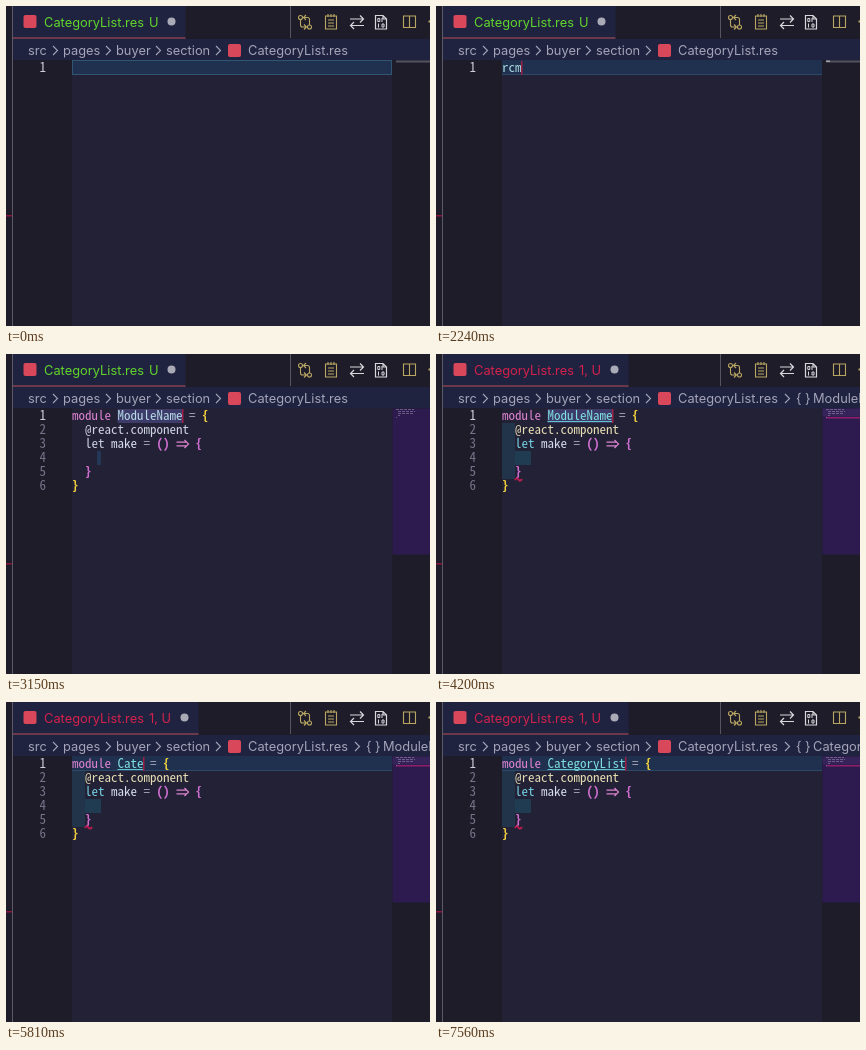
An HTML page for the animation above (8000 ms loop, 424 px wide and 320 px high).

```html
<!DOCTYPE html>
<html lang="en">
<head>
<meta charset="utf-8">
<title>Editor snippet</title>
<style>
html, body { margin: 0; width: 100%; height: 100%; overflow: hidden; background: #1e1c29; }
svg { display: block; width: 424px; height: 320px; }
text { white-space: pre; }
.ui { font: 12.85px Inter, "Open Sans", sans-serif; }
.code { font-family: "Noto Sans Mono CJK JP", "Noto Sans Mono", monospace; }
</style>
</head>
<body>
<svg id="stage" viewBox="0 0 424 320" xmlns="http://www.w3.org/2000/svg"></svg>
<script>
const LOOP = 8000, LEFT = 66, TOP = 55, CELL = 6.5, ROW = 14;
const MONO = '"Noto Sans Mono CJK JP", "Noto Sans Mono", monospace';
const C = {
  navy: '#1f2340', dark: '#1e1c29', page: '#232135', grey: '#a5a4b8', red: '#d4214c',
  icon: '#d9475b', green: '#62d52c', pink: '#dc83cf', cyan: '#80dfe0', gold: '#f2d13e',
  white: '#d5dceb', orchid: '#d06fd2', tool: '#b8a662'
};

// Times at which the visible text changes
const TYPED = [[1960, 'r'], [2100, 'rc'], [2240, 'rcm']];
const NAMES = [[3150, 'ModuleName'], [5530, 'C'], [5670, 'Ca'], [5740, 'Cat'], [5810, 'Cate'],
  [6230, 'Categ'], [6300, 'Catego'], [6440, 'Categor'], [6580, 'Category'],
  [7140, 'CategoryL'], [7210, 'CategoryLi'], [7350, 'CategoryLis'], [7490, 'CategoryList']];
const CRUMBS = [[3640, 'ModuleName'], [6230, 'Cate'], [7000, 'CategoryList']];
const CARET = [[1120, 1610], [1960, 2800], [3150, 3640], [4200, 4760], [5250, LOOP]];

const svg = document.getElementById('stage');
const pen = document.createElement('canvas').getContext('2d');
pen.font = '100px ' + MONO;
const em = 100 / pen.measureText('m').width;
const BOLD = 'font-weight="bold"';

const at = (steps, t) => steps.reduce((v, [time, s]) => t >= time ? s : v, '');
const col = n => LEFT + n * CELL;
const rowY = n => TOP + (n - 1) * ROW;
const rect = (x, y, w, h, fill, more = '') =>
  `<rect x="${x}" y="${y}" width="${w}" height="${h}" fill="${fill}" ${more}/>`;
const path = (d, stroke, w = 1, more = '') =>
  `<path d="${d}" fill="none" stroke="${stroke}" stroke-width="${w}" ${more}/>`;
const ui = (x, y, s, fill) => `<text class="ui" x="${x}" y="${y}" fill="${fill}">${s}</text>`;
const mono = (x, y, s, fill, cell = CELL, more = '') =>
  `<text class="code" x="${x}" y="${y}" font-size="${(cell * em).toFixed(2)}" fill="${fill}" ${more}>${s}</text>`;
const code = (row, n, s, fill, more) => mono(col(n), rowY(row) + 11, s, fill, CELL, more);
const fileIcon = (x, y) => rect(x, y, 13, 13, C.icon, 'rx="2"');
const chevron = x => path(`M${x} 40l4.5 4.5l-4.5 4.5`, C.grey, 1.1);

function toolbar() {
  const y = C.tool, w = '#d8d8dc';
  return path('M284.5 0V32', '#56545f') +
    // compare
    `<g fill="none" stroke="${y}" stroke-width="1.1"><circle cx="294.5" cy="11.5" r="2"/><circle cx="303.5" cy="21" r="2"/>` +
    '<path d="M294.5 13.5V19q0 2 2 2h4M298 18.5l2.5 2.5l-2.5 2.5M303.5 19v-5.5q0-2-2-2h-4M300 9l-2.5 2.5l2.5 2.5"/></g>' +
    // notepad
    path('M319.5 10h11v13h-11zM322 8v3M325 8v3M328 8v3M322 14h6M322 17h6M322 20h6', y, 1.1) +
    // swap
    path('M344 13h13M354 9.5l3.5 3.5l-3.5 3.5M358 19.5h-13M348 16l-3.5 3.5l3.5 3.5', w, 1.2) +
    // binary file
    path('M369.5 9.5h7.5l3.5 3.5v10h-11zM377 9.5v3.5h3.5', w, 1.2) +
    path('M371.8 12.5h2v3h-2zM376 12v4M372.5 17.5v4M376 18h2v3h-2z', w) +
    // split
    path('M397.5 10h12v11.5h-12zM403.5 10v11.5', y, 1.1) +
    rect(422.5, 14.5, 1.5, 2, y);
}

function header(t) {
  const bad = t >= 3570, tint = bad ? C.red : C.green, edge = bad ? 192.5 : 179.5;
  const crumb = at(CRUMBS, t);
  let s = rect(7, 0, edge - 7, 33, C.navy) + rect(7, 31.5, edge - 7, 1, '#b65055') +
    fileIcon(17.5, 9) +
    ui(38, 20.5, 'CategoryList.res', tint) + ui(143, 20.5, bad ? '1, U' : 'U', tint) +
    `<circle cx="${bad ? 178.5 : 165.5}" cy="15.5" r="4" fill="#aaa9b6"/>` + toolbar();
  s += rect(7, 33, 417, 21, C.navy);
  [[22, 'src'], [57, 'pages'], [110, 'buyer'], [160, 'section'], [242, 'CategoryList.res']]
    .forEach(([x, word]) => s += ui(x, 49, word, C.grey));
  s += [47, 100, 150, 210].map(chevron).join('') + fileIcon(222, 38);
  if (crumb) s += chevron(349) + ui(360, 48.5, '{ }', C.grey) + ui(377, 49, crumb, C.grey);
  return s;
}

function minimap(t) {
  if (t < 3150) {
    return rect(390, 54.5, 34, 2, '#55535f') + (t >= 1960 ? rect(390, 54.5, 4, 1.5, '#a3a2ad') : '');
  }
  let s = rect(386.5, 54.5, 37.5, 146, '#2d1b50');
  if (t >= 3570) s += rect(386.5, 54.5, 37.5, 8, '#35235a') + rect(390, 63, 34, 1.5, '#8f2068');
  [[0, 18], [2, 17], [2, 16], [2, 2], [0, 1]].forEach(([x, w], i) =>
    s += path(`M${390 + x} ${55.5 + i * 2}h${w}`, '#9a8fae', 1, 'stroke-dasharray="3 1" opacity=".55"'));
  return s;
}

function popup() {
  const x = 109, hot = '#ff5566', side = 5.53;
  const hit = s => `<tspan fill="${hot}" ${BOLD}>${s}</tspan>`;
  const bracket = y => path(`M91.5 ${y + 12}v-10.5h12v10.5`, '#b9bac8', 1.1) +
    path(`M92 ${y + 12}h12`, '#b9bac8', 1, 'stroke-dasharray="1 2"');
  return rect(86.5, 69.5, 345, 45, '#20294a', 'stroke="#5796ad"') +
    rect(87, 70, 337, 14, '#2b4c72') + bracket(70) + bracket(84) +
    mono(x, 80.5, hit('rcm'), hot) + mono(336, 80.5, 'Rescript-React component', '#d0606f', side) +
    mono(x, 94.5, hit('rcm') + 'wt', C.white) +
    mono(258, 94.5, 'Rescript React Component Module', '#9a9bad', side) +
    mono(90, 108.5, 'abc', '#b9bac8', 5) +
    mono(x, 108.5, hit('R') + 'ea' + hit('c') + 'tDO' + hit('M'), C.white);
}

function snippet(t, name) {
  const lit = t >= 3220, bad = t >= 3570, end = 7 + name.length;
  let s = '';
  if (lit) {
    s += rect(LEFT, rowY(2), 13, ROW * 4, '#22344a') + rect(col(2), rowY(4), 16, ROW, '#1f3c52');
  } else {
    s += rect(91, rowY(4), 4, ROW, '#253757');
  }
  if (t < 5530) s += rect(col(7), TOP, name.length * CELL, ROW, '#3c3b69');
  s += code(1, 0, 'module', C.pink) + code(1, 7, name, bad ? C.cyan : '#b7d9e8') +
    code(1, end + 1, '=', C.grey) + code(1, end + 3, '{', C.gold, BOLD) +
    code(2, 2, '@react.component', bad ? '#e4ddb4' : '#ced3e2') +
    code(3, 2, 'let', bad ? '#72cfe0' : '#c9cee0') + code(3, 6, 'make', C.white) +
    code(3, 11, '=', C.grey) + code(3, 13, '()', C.orchid, BOLD) + code(3, 19, '{', C.orchid, BOLD) +
    path('M170.5 88.2h10.5M170.5 91.8h10.5M178.5 86l4 4l-4 4', C.pink, 1.2) +
    code(5, 2, '}', C.orchid, BOLD) + code(6, 0, '}', C.gold, BOLD);
  if (bad) {
    s += rect(col(7), rowY(1) + 12, name.length * CELL, 1, '#5fc3c9') +
      path('M79 126q1.7-3 3.4-.5t3.6-.5', '#bb1d52', 2);
  }
  return s;
}

function editor(t) {
  const typed = at(TYPED, t), name = at(NAMES, t);
  let s = rect(7, 54, 417, 266, C.dark) + rect(LEFT, 54, 320, 266, C.page) + minimap(t);
  if (!name || t >= 5530) {
    s += rect(LEFT, 54, 320, 15, '#20304f') + path(`M${LEFT} 68.5h320`, '#2c4a67');
    if (!typed && !name) s += rect(LEFT + .5, 54.5, 319, 14, 'none', 'stroke="#2f5572"');
  }
  const rows = name ? 6 : 1;
  for (let i = 1; i <= rows; i++) s += mono(33.5, rowY(i) + 11, i, i === 1 ? '#d0cfdb' : '#77758a');
  s += name ? snippet(t, name) : code(1, 0, typed, '#a9dce0');
  if (!name && t >= 2310) s += popup();
  if (CARET.some(([a, b]) => t >= a && t < b)) {
    s += rect(col(name ? 7 + name.length : typed.length) - .5, TOP, 1.5, ROW, '#9c1f47');
  }
  return s;
}

const frame = rect(0, 0, 424, 320, C.dark) + rect(6, 0, 1, 320, '#5c5a66') +
  rect(0, 209, 6, 1.5, '#8a1539');

let shown = '';
function draw(t) {
  const s = frame + header(t) + editor(t);
  if (s !== shown) svg.innerHTML = shown = s;
}

const start = performance.now();
function tick() {
  draw((performance.now() - start) % LOOP);
  requestAnimationFrame(tick);
}
tick();
</script>
</body>
</html>
```
